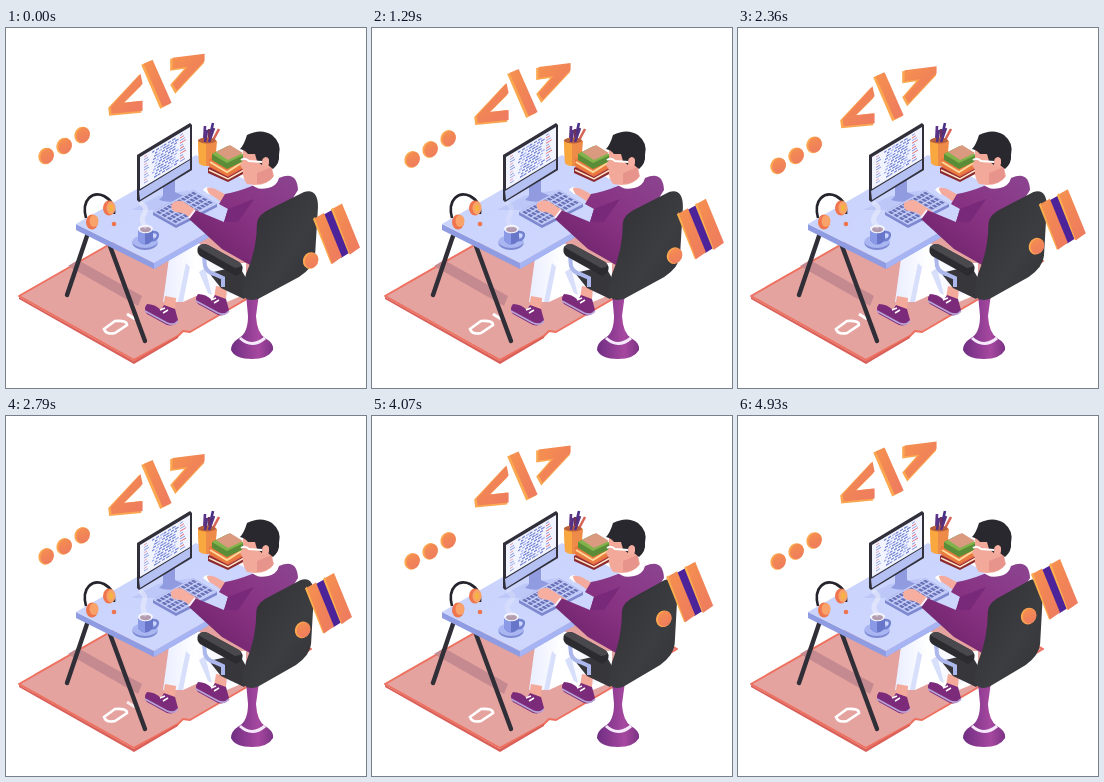
Recreate the animation shown at these times as an HTML page. Size 360x360 px, loop 5000 ms.

```html
<!DOCTYPE html>
<html lang="en">
<head>
<meta charset="utf-8">
<title>Programmer at a desk</title>
<style>
html, body { margin: 0; width: 100%; height: 100%; overflow: hidden; background: #fff; }
svg { display: block; width: 100vw; height: 100vh; }
</style>
</head>
<body>
<svg viewBox="0 0 360 360">
  <defs>
    <linearGradient id="orange" x2="1" y2="1"><stop stop-color="#f6924f"/><stop offset=".5" stop-color="#f18457"/><stop offset="1" stop-color="#ee7a61"/></linearGradient>
    <linearGradient id="desk" x2="1" y2="1"><stop stop-color="#c8d2fc"/><stop offset="1" stop-color="#d0d8fe"/></linearGradient>
    <linearGradient id="sweater" x1="1" x2="0" y2="1"><stop stop-color="#8c4590"/><stop offset=".5" stop-color="#873181"/><stop offset="1" stop-color="#672064"/></linearGradient>
    <linearGradient id="chair" x2="1" y2="1"><stop stop-color="#2f2f34"/><stop offset=".6" stop-color="#3c3d41"/><stop offset="1" stop-color="#323237"/></linearGradient>
    <linearGradient id="jeans" x2="1"><stop stop-color="#e9edff"/><stop offset=".4" stop-color="#fff"/><stop offset="1" stop-color="#eef1ff"/></linearGradient>
    <linearGradient id="stem" x2="1"><stop stop-color="#6f2e83"/><stop offset=".65" stop-color="#a6489f"/><stop offset="1" stop-color="#7c3385"/></linearGradient>
  </defs>

  <g id="carpet">
    <path d="M13 268L190 167L305 233L239 272L184 304L177 303L172 308L128 332Z" fill="#e5a3a0" stroke="#ee705f" stroke-width="2" stroke-linejoin="round"/>
    <path d="M13 269L128 333L172 308V310L128 336L13 271Z" fill="#d95f58"/>
    <path d="M62 238L72 232L136 268L132 278Z" fill="#c58a90"/>
    <path d="M180 235L240 235V266L216 276L190 268L177 274Z" fill="#fff"/>
    <path d="M98 301L109 293Q121 292 121 297L109 305Q100 307 98 301Z" fill="none" stroke="#fff" stroke-width="2.6"/>
    <path id="accent" d="M121 286L129 291" stroke="#fff" stroke-width="3"/>
  </g>

  <g id="legs" stroke="#302f37" stroke-width="4.4" stroke-linecap="round">
    <path d="M82 205L61 267M104 218L139 313"/>
  </g>

  <g id="trousers">
    <path d="M163 230L190 214L236 238L239 258L219 269L202 265L192 243L184 239L177 274L157 274Z" fill="url(#jeans)"/>
    <path d="M184 239L177 274L172 274L180 235Z" fill="#d8dffb"/>
    <path d="M193 244L202 265L206 267L199 240Z" fill="#d8dffb"/>
  </g>
  <g id="shoes">
    <g id="shoe" transform="translate(0 -2)">
      <path d="M159 270L170 272L169 283L157 282Z" fill="#f3aa9a"/>
      <path d="M141 278Q149 278 155 284L158 279L169 283L172 294Q169 301 161 299L141 288Q137 283 141 278Z" fill="#7c2a7a"/>
      <path d="M139 285L161 297Q168 300 172 295" fill="none" stroke="#b9a4d6" stroke-width="1.6"/>
      <path d="M154 284L159 282M157 287L162 284" stroke="#fff" stroke-width="1.5"/>
    </g>
    <use href="#shoe" x="51" y="-10"/>
  </g>

  <g id="table">
    <path d="M70 196L148 235L268 166V172L148 241L70 202Z" fill="#8f9ce2"/>
    <path d="M148 235L268 166V172L148 241Z" fill="#a7b4f3"/>
    <path d="M70 196L190 127L268 166L148 235Z" fill="url(#desk)"/>
    <path d="M125 182L152 168L184 162L158 182Z" fill="#bdc8f8"/>
  </g>

  <g id="headphones">
    <path d="M80 190C75 171 87 163 98 168Q109 174 108 186" fill="none" stroke="#25232c" stroke-width="2.6"/>
    <g fill="#ee754d"><ellipse cx="86" cy="194" rx="6" ry="7.5"/><ellipse cx="103" cy="180" rx="6" ry="7.5"/><circle cx="108" cy="196" r="2.3"/></g>
    <g fill="#f9a269"><ellipse cx="88" cy="193" rx="4.5" ry="6"/><ellipse cx="105" cy="180" rx="4.5" ry="6.5"/></g>
    <ellipse cx="105" cy="180" rx="2" ry="3.4" fill="#f4b43f"/>
  </g>

  <g id="monitor">
    <path d="M157 155L169 148V164L178 168Q169 177 153 172L157 168Z" fill="#909be0"/>
    <path d="M131 127L184 95L186 97V142L133 174L131 172Z" fill="#302f3a"/>
    <path d="M133 163L184 132V141L134 172Z" fill="#b6c1f3"/>
    <path d="M134 129L184 99V131L134 161Z" fill="#f1f3ff"/>
    <g id="code" transform="matrix(1 -.6 0 1 134 129)"/>
  </g>

  <g id="keyboard">
    <path d="M147 184L187 162L211 176V179L170 200L147 187Z" fill="#7d88cf"/>
    <path d="M147 184L187 162L211 176L170 197Z" fill="#c3ccf8"/>
    <g id="keys" transform="matrix(40 -22 23 13 147.5 184)" fill="#6972b6"/>
  </g>

  <g id="mug">
    <ellipse cx="139" cy="215" rx="12.500" ry="7" fill="#7c89d2"/>
    <ellipse cx="139" cy="213.500" rx="12.500" ry="6.500" fill="#a9b6f2"/>
    <path d="M147 204Q154 204 151 210Q149 213 145 212" fill="none" stroke="#7281cf" stroke-width="2.4"/>
    <path d="M132 201V212Q139 221 147 212V201Z" fill="#6776c8"/>
    <path d="M132 201V212Q135 216 139 217V201Z" fill="#8b9ae6"/>
    <ellipse cx="139.500" cy="201" rx="7.600" ry="4.200" fill="#f2f4ff"/>
    <ellipse cx="139.500" cy="201.500" rx="5.500" ry="2.700" fill="#b39bb0"/>
    <path id="steam" fill="none" stroke="#f3f3fb" stroke-width="5" stroke-linecap="round"/>
  </g>

  <g id="pencils" fill="none" stroke-width="2.6">
    <path d="M198 115L199 98" stroke="#5b3389"/><path d="M202 116L207 95" stroke="#493087"/>
    <path d="M205 116L213 101" stroke="#d66457"/><path d="M203 114L203 101" stroke="#6d315c"/>
    <path d="M192 112Q201 107 211 113L209 136Q201 141 193 135Z" fill="#ef8b48" stroke="none"/>
    <path d="M192 112L200 115V138Q195 138 193 135Z" fill="#f9a83f" stroke="none"/>
    <ellipse cx="201" cy="112.500" rx="9" ry="3" fill="#b85f3e" stroke="none"/>
    <path d="M199 114L201 102M203 114L208 100" stroke="#553282"/>
  </g>

  <g id="books">
    <path d="M202 140L220 130L239 140V145L222 154L202 145Z" fill="#8b292f"/>
    <path d="M203 139L220 130L238 140L222 149Z" fill="#e1614b"/>
    <path d="M203 142L222 151L238 142" fill="none" stroke="#ffe2c4" stroke-width="1.500"/>
    <path d="M203 131L220 122L238 132V139L221 148L203 138Z" fill="#ea7b3f"/>
    <path d="M204 134L221 144L237 134" fill="none" stroke="#ffd79b" stroke-width="2"/>
    <path d="M206 126L222 118L238 127V133L221 141L206 132Z" fill="#5b8d38"/>
    <path d="M206 126L222 118L238 127L221 135Z" fill="#82b34b"/>
    <path d="M210 124L224 117L237 125L222 132Z" fill="#d99a80"/>
  </g>

  <g id="person">
    <path d="M197 162Q199 158 204 160L208 163Q206 167 202 166Z" fill="#fff"/>
    <path d="M201 160Q207 159 213 163L222 168L217 175L207 168Q201 165 201 160Z" fill="#f4aa9d"/>
    <path id="hand" d="M166 175Q171 171 177 173L194 184L188 192L178 185L168 183Q164 179 166 175Z" fill="#f6aea0"/>
    <path d="M246 158L273 150Q291 142 292 162L270 197L244 237L216 221L183 191L189 182L218 194L222 181L213 176L219 166Q231 164 246 158Z" fill="url(#sweater)"/>
    <path d="M222 181L248 171L232 194L218 194Z" fill="#78297a"/>
    <path d="M183 190L189 182" stroke="#f7f2ff" stroke-width="2"/>
    <path d="M245 155Q250 163 262 160Q271 158 273 150L266 143L248 145Z" fill="#fff"/>
    <path d="M237 120L261 125L268 148Q262 157 249 157L241 156Q236 149 237 142L234 137L237 132Z" fill="#f3a99a"/>
    <path d="M251 145L266 139L267 149Q261 156 251 156Z" fill="#e7958c"/>
    <path d="M234 121Q238 117 241 107Q255 100 266 107Q276 115 273 127Q274 135 267 141L262 137Q265 129 259 129L256 137L251 133L249 126L242 126Q239 122 234 121Z" fill="#29282f"/>
    <ellipse cx="259.500" cy="134" rx="3.500" ry="4.500" fill="#f6aea0"/>
    <path d="M235 132Q239 129 243 133L256 134" fill="none" stroke="#fff" stroke-width="2"/>
  </g>

  <g id="seat">
    <path d="M240 266H253L250 288Q251 305 259 310Q268 315 267 322Q262 331 246 331Q229 331 225 322Q225 315 233 310Q242 305 242 288Z" fill="url(#stem)"/>
    <path d="M234 310Q246 321 259 310" fill="none" stroke="#f5e8fa" stroke-width="3"/>
    <path d="M203 245L233 238L247 262L238 271L215 260Z" fill="#36363b"/>
    <path d="M198 228L199 238Q201 244 208 246L217 250V259" fill="none" stroke="#acb8ec" stroke-width="4"/>
    <path id="back" d="M251 195Q252 186 266 180L298 164Q312 160 312 179L309 228Q308 239 293 249L252 271Q236 275 236 262L240 246Q251 222 251 195Z" fill="url(#chair)"/>
    <path d="M192 219Q196 214 202 217L233 234Q239 238 235 245L230 248L194 228Q190 224 192 219Z" fill="#2b2b30"/>
    <path d="M192 219Q196 214 202 217L233 234Q237 237 234 239L229 240Z" fill="#48484d"/>
  </g>

  <g id="bars">
    <path d="M317 187L326 182L343 225L335 230Z" fill="#4d239a"/>
    <g id="bar">
      <path d="M307 191L309 189L327 235L325 236Z" fill="#fcae4f"/>
      <path d="M309 190L318 185L336 229L326 236Z" fill="url(#orange)"/>
    </g>
    <use href="#bar" x="18" y="-9.500"/>
    <g class="coin" transform="translate(304.500 232.500)"/>
  </g>
  <g id="coins">
    <g class="coin" transform="translate(40 128)"/>
    <g class="coin" transform="translate(58 118)"/>
    <g class="coin" transform="translate(76 107)"/>
  </g>
  <g id="tag">
    <g id="glyphs" fill="#fba750" transform="translate(-.8 .8)">
      <path id="less" d="M134 46L136 57L119 74L136 72L136 84L104 87L103 79Z"/>
      <path id="slash" d="M136 36L146 32L165 75L155 80Z"/>
      <path id="more" d="M165 30L198 26L199 34L170 65L165 56L179 40L165 42Z"/>
    </g>
    <g fill="url(#orange)" transform="translate(.6 -.2)">
      <path d="M134 46L136 56L117 75L136 73L136 83L105 86L104 79Z"/>
      <path d="M137 36L146 32L165 75L156 79Z"/>
      <path d="M166 30L198 26L198 33L170 63L166 56L181 39L166 41Z"/>
    </g>
  </g>
</svg>
<script>
const LOOP = 5000, STEP = 70;
const get = id => document.getElementById(id);
const shift = (id, x, y) => get(id).setAttribute('transform', `translate(${x} ${y})`);
const ease = p => (1 - Math.cos(Math.PI * Math.min(p, 1))) / 2;
const rect = (x, y, w, h, fill) =>
  `<rect x="${x}" y="${y}" width="${w}" height="${h}"${fill ? ` fill="${fill}"` : ''}/>`;

for (const coin of document.querySelectorAll('.coin')) {
  coin.innerHTML = '<ellipse rx="7.5" ry="8.5" transform="rotate(25)" fill="#fba750"/>' +
    '<ellipse cx="1" cy="-.5" rx="6.6" ry="7.8" transform="rotate(25)" fill="url(#orange)"/>';
}

let lines = '', keys = '';
for (let row = 0; row < 11; row++) {
  const y = 2 + row * 2.6;
  const indent = 12 + (row * 7) % 4;
  lines += rect(4, y, 3 + row % 3, .9, row % 3 ? '#8796df' : '#e59aa6');
  for (let x = indent; x < 36; x += 4) {
    lines += rect(x, y, 2.4 + (x + row * 3) % 3 * .6, 1.3, (x + row) % 5 ? '#6f80d2' : '#a2aff0');
  }
  lines += rect(40, y, 3 + (row * 5) % 4, .9, row % 2 ? '#df6470' : '#7f92dd');
}
for (let row = 0; row < 4; row++) {
  for (let col = 0; col < 11; col++) keys += rect(.03 + col * .087, .06 + row * .23, .06, .16);
}
get('code').innerHTML = lines;
get('keys').innerHTML = keys;

function draw(time) {
  const t = Math.floor(time % LOOP / STEP) * STEP;
  const drift = ease(t / LOOP);
  const swing = 2 * Math.PI * (t - 2330) / LOOP;
  const wave = 2 * Math.PI * t / LOOP;

  shift('tag', 0, 7 + 6.35 * Math.cos(swing) - .9 * Math.cos(2 * swing));
  shift('bars', -14 * drift, -32.5 * drift);
  shift('coins', 0, 17.5 * ease(t / 4300));
  shift('hand', .7 * Math.sin(3 * wave), .5 * Math.cos(3 * wave));
  get('back').setAttribute('transform', `translate(${24 * drift} 0) scale(${1 - .1 * drift} 1)`);
  get('accent').setAttribute('opacity', t < 2600 ? 1 : Math.max(0, 1 - (t - 2600) / 600));

  const bend = 3 * Math.sin(2 * wave);
  get('steam').setAttribute('d', `M139 198Q${134 + bend} 192 138 186T${136 - bend / 2} 176`);
  get('steam').setAttribute('opacity', .35 + .15 * Math.cos(2 * wave));
  requestAnimationFrame(() => draw(performance.now() - start));
}
const start = performance.now();
draw(0);
</script>
</body>
</html>
```
